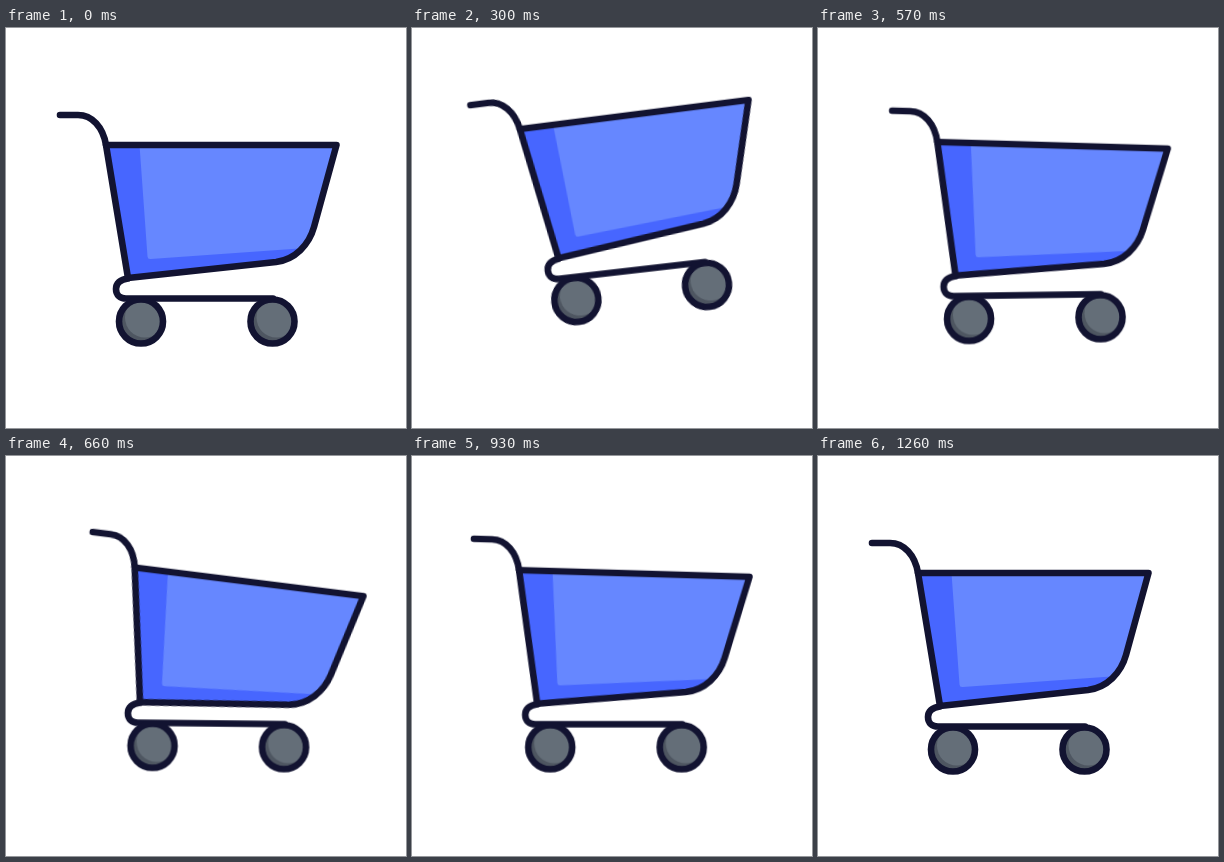
Write an HTML page that moves like this. It is 400 px wide and 400 px high and loops after 3.29 s.

```html
<!DOCTYPE html>
<html lang="en">
<head>
<meta charset="utf-8">
<title>Shopping cart</title>
<style>
  html, body { margin: 0; width: 100%; height: 100%; overflow: hidden; background: #fff; }
  svg { display: block; width: 100%; height: 100%; }

  .line { fill: none; stroke: #121331; stroke-width: 6.6; stroke-linecap: round; stroke-linejoin: round; }

  /* 1% = 12 ms; the clock below sets --t */
  .shift, .hop, .tilt, .swing {
    animation: 1200ms cubic-bezier(.37, 0, .63, 1) calc(var(--t, 0) * -1ms) both paused;
    transform-origin: 122px 250px;
  }
  .shift { animation-name: shift; }
  .hop { animation-name: hop; }
  .tilt { animation-name: tilt; }
  .swing { animation-name: swing; }

  @keyframes shift {
    0% { transform: translateX(0); }
    25% { transform: translateX(24.5px); }
    35.8% { transform: translateX(24.7px); animation-timing-function: linear; }
    47.5% { transform: translateX(15.5px); animation-timing-function: linear; }
    62.5% { transform: translateX(8.5px); animation-timing-function: linear; }
    77.5% { transform: translateX(3.2px); animation-timing-function: ease-out; }
    95%, 100% { transform: translateX(0); }
  }
  @keyframes hop {
    0% { transform: translateY(0); animation-timing-function: cubic-bezier(.5, 0, .65, 1); }
    33.3% { transform: translateY(-24px); }
    51.2% { transform: translateY(0); }
    63.3% { transform: translateY(-17px); }
    82%, 100% { transform: translateY(0); }
  }
  @keyframes tilt {
    0% { transform: rotate(0deg); animation-timing-function: cubic-bezier(.25, .1, .65, 1); }
    33.3% { transform: rotate(-7.5deg); }
    51.2% { transform: rotate(0deg); }
    63.7% { transform: rotate(2.7deg); }
    77.5%, 100% { transform: rotate(0deg); }
  }
  @keyframes swing {
    0% { transform: rotate(0deg); }
    12.5% { transform: rotate(6deg); }
    35.8% { transform: rotate(-6deg); animation-timing-function: cubic-bezier(.33, 0, .67, .33); }
    47.5% { transform: rotate(2.4deg); animation-timing-function: cubic-bezier(.33, .67, .67, 1); }
    53.7% { transform: rotate(7deg); }
    65.4% { transform: rotate(-7.3deg); }
    79.2% { transform: rotate(2deg); }
    92.5%, 100% { transform: rotate(0deg); }
  }
</style>
</head>
<body>
<svg viewBox="0 0 400 400">
  <defs>
    <path id="basket" d="M100 117H330.5L308 199C303 217 289 231.500 270 234L122 250Z"/>
    <clipPath id="inside"><use href="#basket"/></clipPath>
    <clipPath id="disc"><circle r="22"/></clipPath>
    <g id="wheel">
      <circle r="22" fill="#4e5661"/>
      <circle cx="4" cy="-4" r="20" fill="#646e78" clip-path="url(#disc)"/>
      <circle r="22" class="line"/>
    </g>
  </defs>

  <g class="shift"><g class="hop"><g class="tilt">
    <path class="line" d="M122 250.500C114 251.500 110 255.500 110 261C110 267 114 270.500 120 270.500H267"/>
    <use href="#wheel" x="135" y="293.500"/>
    <use href="#wheel" x="266.500" y="293.500"/>
    <g class="swing">
      <use href="#basket" fill="#4766ff"/>
      <path d="M133.500 117L141.500 228.500Q141.700 231.200 144.500 231L293 220.500L340 217V117Z" fill="#6687ff" clip-path="url(#inside)"/>
      <use href="#basket" class="line"/>
      <path class="line" d="M54 87H72C86 87 97 99 100 117"/>
    </g>
  </g></g></g>
</svg>
<script>
  const LOOP = 3290, TICK = 30, END = 1200;
  const start = performance.now();

  // Advance in 30 ms ticks, then rest until the loop restarts.
  function draw() {
    const t = (performance.now() - start) % LOOP;
    const tick = Math.floor(t / TICK) * TICK;
    document.documentElement.style.setProperty('--t', Math.min(tick, END));
    requestAnimationFrame(draw);
  }
  draw();
</script>
</body>
</html>
```
